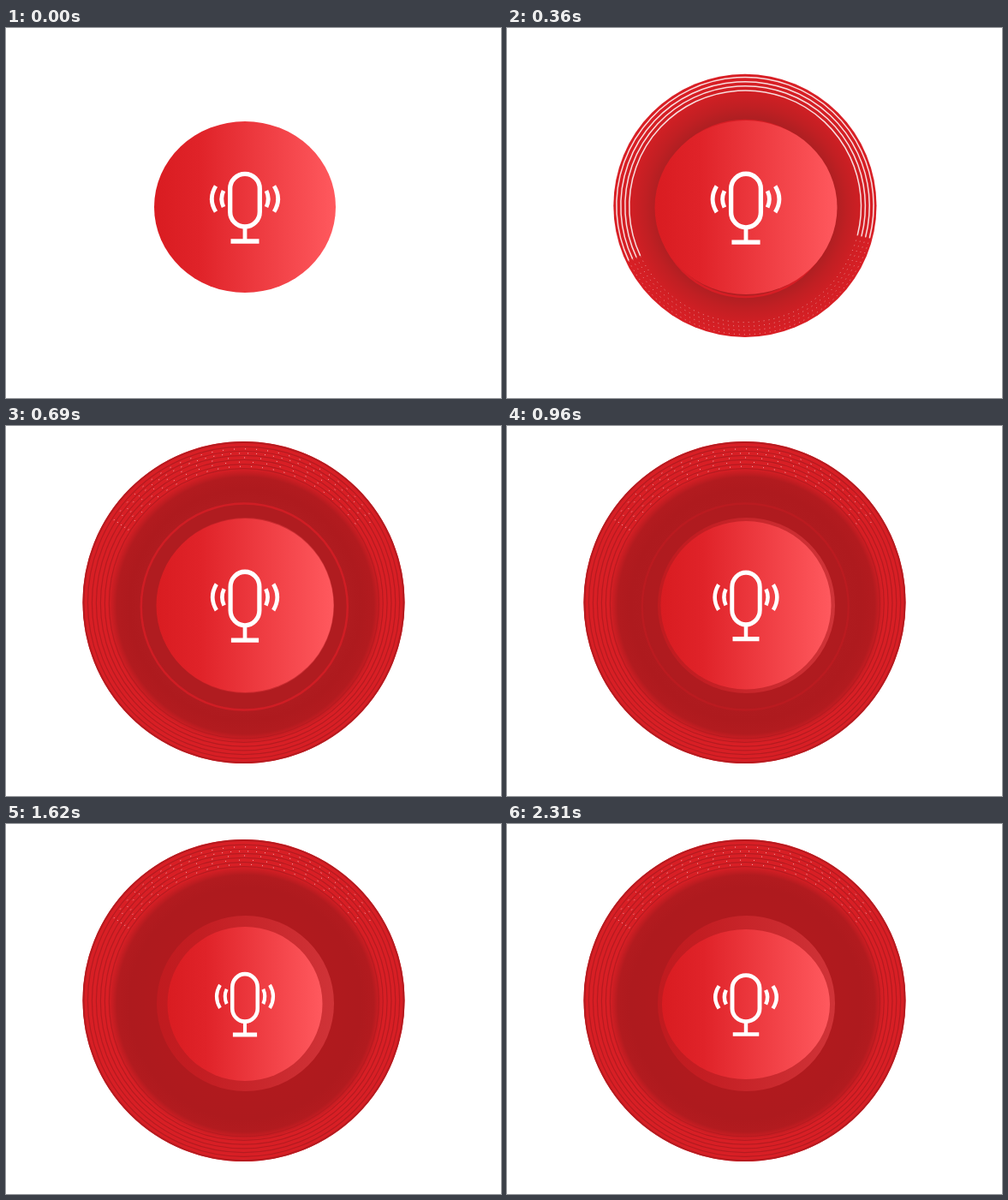
Write an HTML page with a canvas that moves like this. It is 578 by 432 pixels and loops after 2.34 s.

```html
<!DOCTYPE html>
<html>
<head>
<meta charset="utf-8">
<style>
html, body { margin: 0; width: 100%; height: 100%; overflow: hidden; background: #fff; }
canvas { display: block; }
</style>
</head>
<body>
<canvas id="stage" width="578" height="432"></canvas>
<script>
const ctx = document.getElementById('stage').getContext('2d');
const LOOP = 2340, STEP = 30, TAU = Math.PI * 2;
const RIPPLE_START = 60, RIPPLE_END = 570;

// time, horizontal radius, vertical radius, centre y
const buttonKeys = [
  [0, 106, 100, 209], [360, 106.5, 101.5, 209.5], [510, 105, 102.5, 209.5],
  [690, 103.5, 101.5, 209.5], [1230, 95.5, 95, 209], [1620, 90.5, 90, 210],
  [1750, 90.7, 89.4, 210.2], [2190, 96, 88.2, 210.5], [2310, 98, 87.5, 210.5]
];

// disc colours at the radii below, from the button outwards
const shadeRadii = [105, 118, 135, 150, 160];
const shadeKeys = [
  [60, 'bd2024 d02025 d81f25 d81f25 d81f25'],
  [360, 'b01f22 c01f23 d01f24 d81f25 d81f25'],
  [510, 'b01f23 bd2024 c42226 cf2026 dc1f26'],
  [570, 'b01d21 b01c20 ae1a1e b21b1f d81f25'],
  [1110, 'b01a1e af1a1e ae1a1e b21b1f d81f25']
].map(([t, list]) => [t, ...list.split(' ').flatMap(hex =>
  [0, 2, 4].map(i => parseInt(hex.slice(i, i + 2), 16)))]);

const clamp = v => Math.max(0, Math.min(1, v));
const lerp = (a, b, p) => a + (b - a) * p;

function sample(keys, t) {
  let i = 0;
  while (i < keys.length - 2 && t > keys[i + 1][0]) i++;
  const a = keys[i], b = keys[i + 1];
  const p = clamp((t - a[0]) / (b[0] - a[0]));
  return a.slice(1).map((v, n) => lerp(v, b[n + 1], p));
}

function ripple(t) {
  const p = clamp((t - RIPPLE_START) / (RIPPLE_END - RIPPLE_START));
  return { x: lerp(278.5, 277.5, p), y: lerp(209.5, 206, p), r: lerp(104.5, 188, p) };
}

// angles are in half turns, clockwise from the right
function ring({ x, y, r }, color, width, from = 0, to = 2, dash = []) {
  ctx.setLineDash(dash);
  ctx.beginPath();
  ctx.arc(x, y, r, from * Math.PI, to * Math.PI);
  ctx.strokeStyle = color;
  ctx.lineWidth = width;
  ctx.stroke();
  ctx.setLineDash([]);
}

function buttonGradient(x, rx) {
  const g = ctx.createLinearGradient(x - rx, 0, x + rx, 0);
  g.addColorStop(0, '#d91c21');
  g.addColorStop(0.25, '#e02329');
  g.addColorStop(1, '#ff595e');
  return g;
}

function fillEllipse(x, y, rx, ry, fill) {
  ctx.beginPath();
  ctx.ellipse(x, y, rx, ry, 0, 0, TAU);
  ctx.fillStyle = fill;
  ctx.fill();
}

function drawDisc(t) {
  const outer = ripple(t);
  const colors = sample(shadeKeys, t);
  const shade = ctx.createRadialGradient(279.5, 209.5, 0, 279.5, 209.5, 160);
  shadeRadii.forEach((r, i) => {
    const rgb = colors.slice(i * 3, i * 3 + 3).map(Math.round);
    shade.addColorStop(r / 160, `rgb(${rgb})`);
  });
  fillEllipse(outer.x, outer.y, outer.r, outer.r, shade);
}

function drawTrails(t) {
  const last = Math.min(t, RIPPLE_END);
  const gap = 1 - clamp((t - 370) / 100);
  for (let s = RIPPLE_START; s <= last; s += STEP) {
    const edge = ripple(s);
    const age = (last - s) / STEP;
    if (gap > 0 && age > 0 && age < 5 && edge.r > 108) {
      const slot = { ...edge, r: edge.r + 1.4 };
      ring(slot, `rgba(255,255,255,${gap * 0.85})`, 1.5, 0.86, 2.08);
      ring(slot, `rgba(255,255,255,${gap * 0.5})`, 1, 0.08, 0.86, [1, 5]);
    }
    if (t > 390 && edge.r > 154) {
      ring({ ...edge, r: edge.r - 1 }, '#b51b20', s === RIPPLE_END ? 2 : 1.2);
      if (age > 1) {
        const dash = [1, 9 + (s / STEP) % 4 * 3];
        ring({ ...edge, r: edge.r + 1.5 }, 'rgba(255,255,255,.75)', 1, 1.18, 1.82, dash);
      }
    }
  }
}

function drawInnerRing(t) {
  if (t < 360 || t >= 1140) return;
  const p = clamp((t - 360) / 240);
  const alpha = 0.9 * (1 - clamp((t - 600) / 500));
  const r = lerp(103, 120.5, 1 - (1 - p) ** 2);
  ring({ x: 278.3, y: 211, r }, `rgba(220,31,38,${alpha})`, 2.5);
}

function drawMicrophone() {
  ctx.strokeStyle = '#fff';
  ctx.lineWidth = 5.3;
  ctx.beginPath();
  ctx.roundRect(-17.3, -38.7, 34.6, 61.7, 17.3);
  ctx.moveTo(-16.5, 40);
  ctx.lineTo(16.5, 40);
  ctx.stroke();

  ctx.lineWidth = 4.8;
  ctx.beginPath();
  ctx.moveTo(0, 23);
  ctx.lineTo(0, 39);
  for (const side of [-1, 1]) {
    ctx.moveTo(side * 34, -24.5);
    ctx.quadraticCurveTo(side * 43.4, -9.5, side * 34, 5.5);
    ctx.moveTo(side * 25, -19);
    ctx.quadraticCurveTo(side * 29.5, -9.5, side * 25, 0);
  }
  ctx.stroke();
}

function drawButton(t) {
  const [rx, ry, y] = sample(buttonKeys, t);
  const x = 279;
  if (t > 510) {
    ctx.globalAlpha = 0.4;
    fillEllipse(279.5, 209.5, 103.5, 102.5, buttonGradient(279.5, 103.5));
    ctx.globalAlpha = 1;
  }
  fillEllipse(x, y, rx, ry, buttonGradient(x, rx));
  ctx.save();
  ctx.translate(x, y);
  ctx.scale(rx / 106, ry / 100);
  drawMicrophone();
  ctx.restore();
}

function draw(now) {
  const time = now % LOOP;
  const t = time < RIPPLE_START ? 0 : Math.floor(time / STEP) * STEP;
  ctx.fillStyle = '#fff';
  ctx.fillRect(0, 0, 578, 432);
  if (t >= RIPPLE_START) {
    drawDisc(t);
    drawTrails(t);
    drawInnerRing(t);
  }
  drawButton(t);
}

const start = performance.now();
function tick() {
  draw(performance.now() - start);
  requestAnimationFrame(tick);
}
tick();
</script>
</body>
</html>
```
